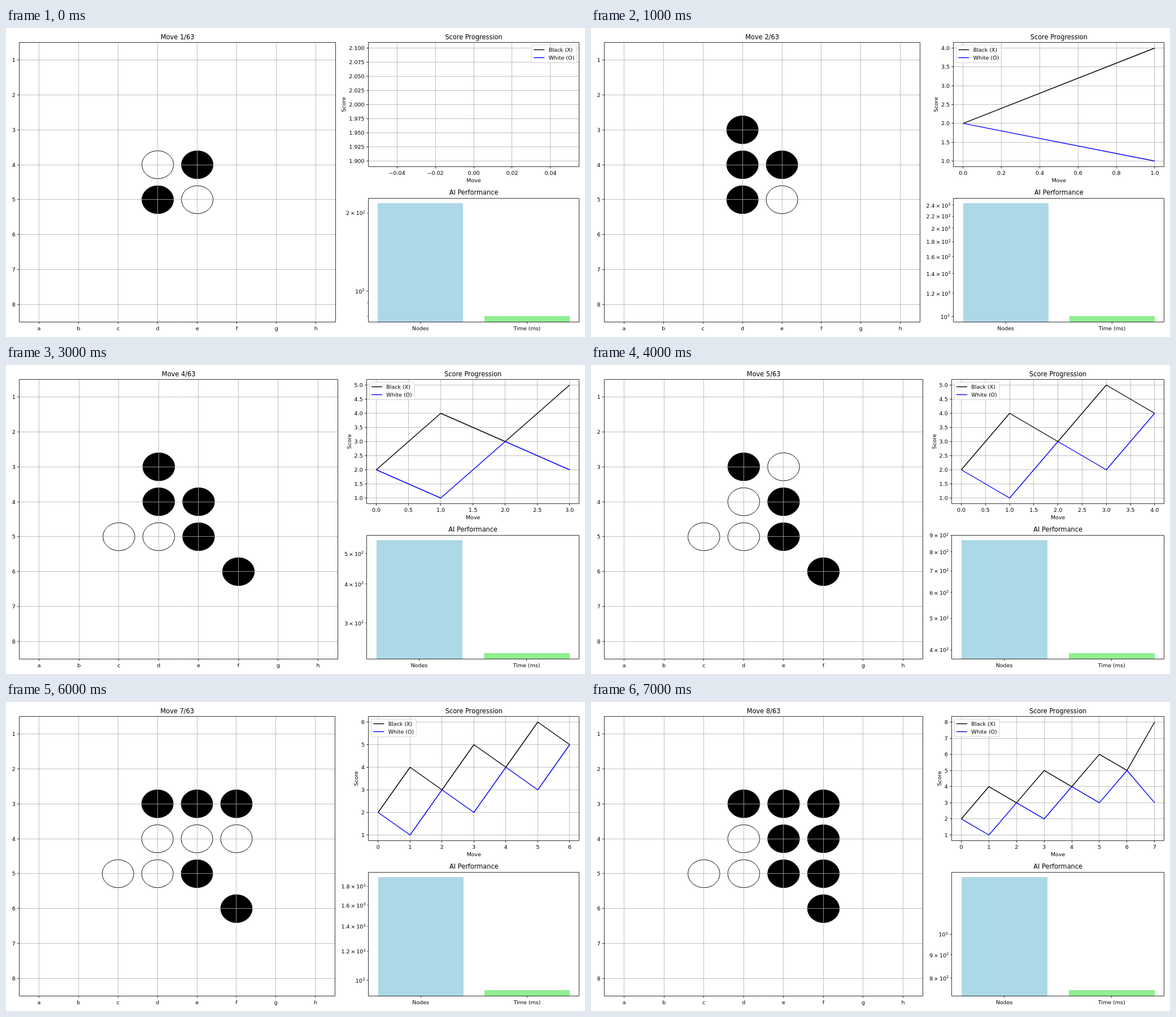
An HTML page with a canvas that plays this animation: 1025 by 547 pixels, repeating every 8000 ms.

```html
<!DOCTYPE html>
<html lang="en">
<head>
<meta charset="utf-8">
<title>Board game progress</title>
<style>
html, body { margin: 0; width: 100%; height: 100%; overflow: hidden; background: #fff; }
canvas { display: block; }
</style>
</head>
<body>
<canvas id="stage" width="1025" height="547"></canvas>
<script>
const ctx = document.getElementById('stage').getContext('2d');
const STEP_MS = 1000;
const FONT = 9.49, TITLE_FONT = 11.39;
const TICK = 3.3, MINOR_TICK = 1.9, THIN = 0.8;
const GRID = '#b0b0b0';
const COLUMNS = 'abcdefgh';

const MOVES = ['d3', 'c5', 'f6', 'e3', 'f3', 'f4', 'f5'];
const PERFORMANCE = [[217, 80], [243, 100], [440, 190], [550, 240],
  [866, 390], [960, 440], [1899, 940], [1337, 751]];
const WIDE = { boardRight: 587.8, chartLeft: 638.4 };
const NARROW = { boardRight: 582.7, chartLeft: 641.8 };
const FIRST = { boardRight: 583.7, chartLeft: 641.2 };
const LAYOUTS = [FIRST, NARROW, WIDE, WIDE, WIDE, WIDE, NARROW, WIDE];

// Game rules: returns the board after a disc is placed and lines are flipped.
function play(board, move, color) {
  const next = { ...board, [move]: color };
  const col = COLUMNS.indexOf(move[0]), row = +move[1];
  for (let dx = -1; dx <= 1; dx++) {
    for (let dy = -1; dy <= 1; dy++) {
      if (!dx && !dy) continue;
      const run = [];
      for (let n = 1; n < 8; n++) {
        const cell = COLUMNS[col + dx * n] + (row + dy * n);
        if (!board[cell]) break;
        if (board[cell] === color) {
          run.forEach(c => { next[c] = color; });
          break;
        }
        run.push(cell);
      }
    }
  }
  return next;
}

const boards = [{ d4: 'white', e4: 'black', d5: 'black', e5: 'white' }];
MOVES.forEach((move, i) => boards.push(play(boards[i], move, i % 2 ? 'white' : 'black')));
const count = (board, color) => Object.values(board).filter(c => c === color).length;
const scores = boards.map(b => ({ black: count(b, 'black'), white: count(b, 'white') }));

const snap = v => Math.floor(v) + 0.5;

function line(points, color = '#000', width = THIN) {
  ctx.beginPath();
  points.forEach(([x, y]) => ctx.lineTo(x, y));
  ctx.strokeStyle = color;
  ctx.lineWidth = width;
  ctx.stroke();
}

function text(str, x, y, align = 'center', size = FONT) {
  ctx.font = `${size}px "DejaVu Sans", sans-serif`;
  ctx.textAlign = align;
  ctx.fillStyle = '#000';
  ctx.fillText(str, x, Math.round(y));
  return ctx.measureText(str).width;
}

function frame(a, title) {
  const x = snap(a.left), y = snap(a.top);
  ctx.strokeStyle = '#000';
  ctx.lineWidth = THIN;
  ctx.strokeRect(x, y, snap(a.right) - x, snap(a.bottom) - y);
  text(title, (a.left + a.right) / 2, a.top - 5.6, 'center', TITLE_FONT);
}

function xTick(a, x, label) {
  const sx = snap(x), sy = snap(a.bottom);
  line([[sx, sy], [sx, sy + TICK]]);
  text(label, x, a.bottom + 14.4);
}

function yTick(a, y, length = TICK) {
  const sx = snap(a.left), sy = snap(y);
  line([[sx, sy], [sx - length, sy]]);
}

const gridX = (a, x) => line([[snap(x), a.top], [snap(x), a.bottom]], GRID);
const gridY = (a, y) => line([[a.left, snap(y)], [a.right, snap(y)]], GRID);

function drawBoard(index, right) {
  const a = { left: 23.5, right, top: 25.5, bottom: 520.5 };
  const w = (a.right - a.left) / 8, h = (a.bottom - a.top) / 8;
  const cx = i => a.left + w * (i + 0.5);
  const cy = i => a.top + h * (i + 0.5);

  for (const [cell, color] of Object.entries(boards[index])) {
    ctx.beginPath();
    ctx.ellipse(cx(COLUMNS.indexOf(cell[0])), cy(cell[1] - 1), w * 0.4, h * 0.4, 0, 0, Math.PI * 2);
    ctx.fillStyle = color;
    ctx.fill();
    ctx.strokeStyle = '#000';
    ctx.lineWidth = 0.95;
    ctx.stroke();
  }
  for (let i = 0; i < 8; i++) {
    gridX(a, cx(i));
    gridY(a, cy(i));
  }
  for (let i = 0; i < 8; i++) {
    xTick(a, cx(i), COLUMNS[i]);
    yTick(a, cy(i));
    text(i + 1, a.left - 6.7, cy(i) + 3.5, 'right');
  }
  frame(a, `Move ${index + 1}/63`);
}

function niceStep(span) {
  const raw = span / 9;
  const unit = 10 ** Math.floor(Math.log10(raw));
  return unit * [1, 2, 2.5, 5, 10].find(m => m * unit >= raw - unit * 1e-6);
}

function linearTicks(lo, hi) {
  const step = niceStep(hi - lo);
  const ticks = [];
  for (let k = Math.ceil(lo / step - 1e-6); k * step <= hi + step * 1e-6; k++) ticks.push(k * step);
  let digits = 0;
  while (Math.abs(step * 10 ** digits - Math.round(step * 10 ** digits)) > 1e-6) digits++;
  return { ticks, label: v => v.toFixed(digits).replace(/^-/, '\u2212') };
}

function padded(lo, hi) {
  const pad = (hi - lo) * 0.05;
  return [lo - pad, hi + pad];
}

function drawLegend(a, atRight) {
  const w = 79.7, x = atRight ? a.right - 4.7 - w : a.left + 4.7;
  ctx.beginPath();
  ctx.roundRect(snap(x), 30.5, w, 31, 2);
  ctx.fillStyle = 'rgba(255,255,255,0.8)';
  ctx.fill();
  ctx.strokeStyle = 'rgba(204,204,204,0.8)';
  ctx.lineWidth = 0.95;
  ctx.stroke();
  [['Black (X)', '#000', 38.5], ['White (O)', '#00f', 52.5]].forEach(([name, color, y]) => {
    line([[x + 3.8, y], [x + 22.8, y]], color, 1.42);
    text(name, x + 30.2, y + 3.6, 'left');
  });
}

function drawScores(index, left) {
  const a = { left, right: 1014.9, top: 25.5, bottom: 245.5 };
  const shown = scores.slice(0, index + 1);
  const values = shown.flatMap(s => [s.black, s.white]);
  const [x0, x1] = index ? padded(0, index) : [-0.055, 0.055];
  const [y0, y1] = index ? padded(Math.min(...values), Math.max(...values)) : [1.89, 2.11];
  const px = v => a.left + (v - x0) / (x1 - x0) * (a.right - a.left);
  const py = v => a.bottom - (v - y0) / (y1 - y0) * (a.bottom - a.top);
  const xs = linearTicks(x0, x1), ys = linearTicks(y0, y1);

  xs.ticks.forEach(v => gridX(a, px(v)));
  ys.ticks.forEach(v => gridY(a, py(v)));
  if (index) {
    line(shown.map((s, i) => [px(i), py(s.black)]), '#000', 1.42);
    line(shown.map((s, i) => [px(i), py(s.white)]), '#00f', 1.42);
  }
  xs.ticks.forEach(v => xTick(a, px(v), xs.label(v)));
  let labelWidth = 0;
  ys.ticks.forEach(v => {
    yTick(a, py(v));
    labelWidth = text(ys.label(v), a.left - 6.7, py(v) + 3.5, 'right');
  });
  frame(a, 'Score Progression');
  text('Move', (a.left + a.right) / 2, 273);
  ctx.save();
  ctx.translate(Math.round(a.left - 12.7 - labelWidth), (a.top + a.bottom) / 2);
  ctx.rotate(-Math.PI / 2);
  text('Score', 0, 0);
  ctx.restore();
  drawLegend(a, index === 0 || index === 2);
}

function powerLabel(value, right, y) {
  const exp = Math.floor(Math.log10(value) + 1e-9);
  const factor = +(value / 10 ** exp).toFixed(2);
  let x = right - text(exp, right, y - 3.6, 'right', FONT * 0.7);
  x -= text('10', x, y, 'right');
  if (factor === 1) return;
  x -= FONT * 0.2;
  x -= text('×', x, y, 'right') + FONT * 0.2;
  text(factor, x, y, 'right');
}

function logTicks(lo, hi) {
  const decades = Math.log10(hi / lo);
  const inside = v => v >= lo && v <= hi;
  const major = [10, 100, 1000, 10000].filter(inside);
  let minor = [10, 100, 1000].flatMap(p => [2, 3, 4, 5, 6, 7, 8, 9].map(k => k * p)).filter(inside);
  if (minor.length <= 1) minor = linearTicks(lo, hi).ticks.filter(v => !major.includes(Math.round(v)));
  const labelled = v => decades <= 0.4 ||
    [1, 2, 4, 6].includes(Math.round(v / 10 ** Math.floor(Math.log10(v))));
  return { major, minor, labelled };
}

function drawPerformance(index, left) {
  const a = { left, right: 1014.9, top: 301, bottom: 520.5 };
  const [nodes, time] = PERFORMANCE[index];
  const [lo, hi] = padded(Math.log10(time), Math.log10(nodes));
  const px = v => a.left + (v + 0.49) / 1.98 * (a.right - a.left);
  const py = v => a.bottom - (Math.log10(v) - lo) / (hi - lo) * (a.bottom - a.top);

  [['Nodes', nodes, '#add8e6'], ['Time (ms)', time, '#90ee90']].forEach(([name, value, color], i) => {
    const x = Math.round(px(i - 0.4)), y = Math.floor(py(value));
    ctx.fillStyle = color;
    ctx.fillRect(x, y, Math.round(px(i + 0.4)) - x, a.bottom - y);
    xTick(a, px(i), name);
  });
  const { major, minor, labelled } = logTicks(10 ** lo, 10 ** hi);
  major.forEach(v => {
    yTick(a, py(v));
    powerLabel(v, a.left - 6.7, py(v) + 4);
  });
  minor.forEach(v => {
    yTick(a, py(v), MINOR_TICK);
    if (labelled(v)) powerLabel(v, a.left - 5.2, py(v) + 4);
  });
  frame(a, 'AI Performance');
}

function draw(index) {
  const { boardRight, chartLeft } = LAYOUTS[index];
  ctx.fillStyle = '#fff';
  ctx.fillRect(0, 0, 1025, 547);
  ctx.lineJoin = 'round';
  drawBoard(index, boardRight);
  drawScores(index, chartLeft);
  drawPerformance(index, chartLeft);
}

const start = performance.now();
function tick() {
  const elapsed = Math.max(0, performance.now() - start);
  draw(Math.floor(elapsed / STEP_MS) % boards.length);
  requestAnimationFrame(tick);
}
tick();
</script>
</body>
</html>
```
